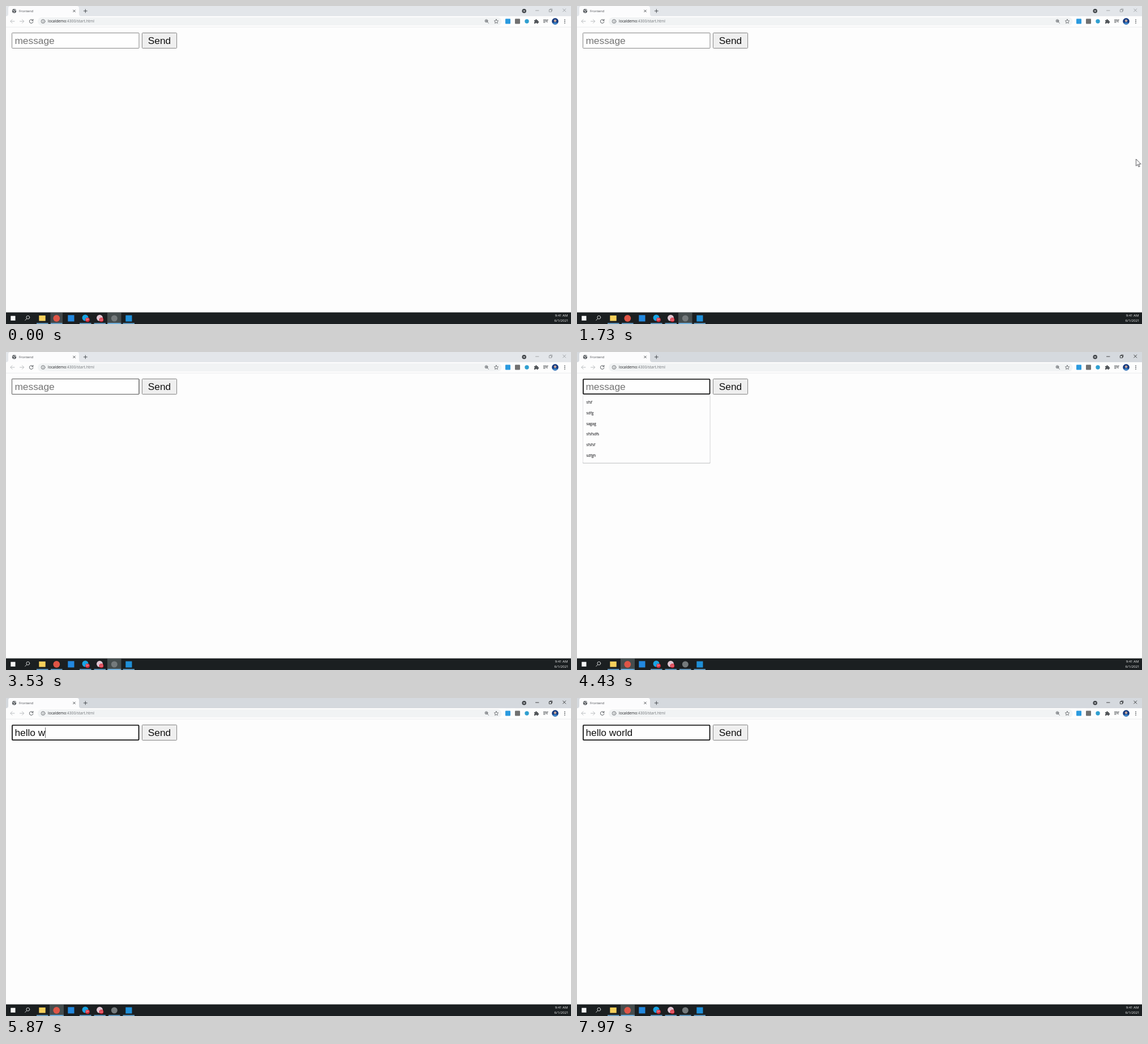
An HTML page for the animation above (8 s loop, 998 by 561 pixels).

```html
<!DOCTYPE html>
<html lang="en">
<head>
<meta charset="utf-8">
<title>Frontend</title>
<style>
  html, body { margin: 0; width: 100%; height: 100%; overflow: hidden; background: #fdfdfd; }
  svg { display: block; width: 100%; height: 100%; }
  text { font-family: "Open Sans", "Noto Sans", sans-serif; }
  .form text { font: 17.33px "Liberation Sans", Arial, sans-serif; white-space: pre; }
  .line { fill: none; stroke-linecap: round; stroke-linejoin: round; }

  /* one 8 s clock for every state */
  .idle, .live, .hover, .menu { animation: 8s step-end infinite; }
  .idle { animation-name: idle; }
  .live { animation-name: live; }
  .hover { animation-name: hover; }
  .menu { animation-name: menu; }
  .glow { animation: glow 8s linear infinite; }
  .pointer { animation: move 8s ease-in-out infinite; }

  @keyframes idle { 0% { opacity: 1 } 46.25%, 100% { opacity: 0 } }
  @keyframes live { 0% { opacity: 0 } 46.25%, 100% { opacity: 1 } }
  @keyframes hover { 0% { opacity: 0 } 38.12% { opacity: 1 } 46.25%, 100% { opacity: 0 } }
  @keyframes menu { 0% { opacity: 0 } 53.75% { opacity: 1 } 60.375%, 100% { opacity: 0 } }
  @keyframes glow { 0%, .4% { opacity: 1 } 3%, 100% { opacity: 0 } }
  @keyframes move {
    0%, 9.6% { transform: translate(1004px, 278px) }
    9.9%, 20.8% { transform: translate(997px, 275px); animation-timing-function: ease-in }
    25.8% { transform: translate(785px, 163px); animation-timing-function: ease-out }
    30.8%, 31.5% { transform: translate(495px, 237px) }
    38.1% { transform: translate(231px, 73px); animation-timing-function: step-start }
    38.2%, 100% { transform: translate(1004px, 278px) }
  }
</style>
</head>
<body>
<svg viewBox="0 0 998 561">
  <defs>
    <g id="controls" class="line">
      <path d="M935.5 8h5.5M983.7 5l5 5m0-5l-5 5"/>
      <path d="M959.7 6.5h3.8v3.8h-3.8zM960.9 6.500v-1.400h3.800v3.800h-1.200"/>
    </g>
    <clipPath id="face"><circle cx="970" cy="27" r="5.8"/></clipPath>
  </defs>

  <rect width="998" height="561" fill="#fdfdfd"/>

  <!-- tab strip -->
  <rect class="idle" width="998" height="18" fill="#e3e6ea"/>
  <rect class="live" width="998" height="18" fill="#d5d9de"/>
  <path d="M0 18q4 0 4-4V4q0-4 4-4h117q4 0 4 4v10q0 4 4 4z" fill="#fcfcfd"/>
  <circle cx="14.500" cy="8.800" r="3.700" fill="#5a5e62"/>
  <path d="M12 7.500l2 .5 1 1.500-1 1.800M15 5.800l1 1.500 1.600.2" class="line" stroke="#fcfcfd" stroke-width=".9"/>
  <text x="23" y="11" font-size="5.900" fill="#4a4d51">Frontend</text>
  <path d="M118.700 7l3.600 3.600m0-3.600l-3.600 3.600M137.300 8.800h6m-3-3v6" class="line" stroke="#3c4043" stroke-width=".9"/>
  <circle cx="915.200" cy="8.800" r="3.800" fill="#45494d"/>
  <path d="M913.300 7.900h3.800l-1.900 2.300z" fill="#e4e6ea"/>
  <use href="#controls" class="idle" stroke="#85888b" stroke-width=".7"/>
  <use href="#controls" class="live" stroke="#1c1d1f" stroke-width=".8"/>

  <!-- toolbar -->
  <path d="M0 37.200h998" stroke="#e4e5e7" stroke-width=".7"/>
  <rect x="56" y="20" width="819.500" height="14.300" rx="7.150" fill="#f1f3f4"/>
  <g class="line" stroke="#b9bcbf" stroke-width="1">
    <path d="M15 27H8m3-3.200L7.800 27l3.200 3.200M24.500 27h7m-3-3.200l3.200 3.200-3.200 3.200"/>
  </g>
  <g class="line" stroke="#505458" stroke-width="1">
    <path d="M47.400 25.200a3.300 3.300 0 1 0 .5 2.700M47.900 23.500v2.300h-2.400"/>
    <circle cx="65.500" cy="27.100" r="3.300" stroke-width=".8"/>
    <path d="M65.500 26.900v1.800m0-3.400v.1" stroke-width=".8"/>
    <circle cx="848.500" cy="26.300" r="2.400" stroke-width=".8"/>
    <path d="M850.300 28.200l2.200 2.200M847.500 26.300h2m-1-1v2" stroke-width=".8"/>
    <path d="M866 23.400l1.100 2.400 2.600.3-1.900 1.800.5 2.600-2.300-1.300-2.300 1.300.5-2.600-1.900-1.800 2.600-.3z" stroke-width=".75"/>
    <path d="M949.400 24.500h5m-5 2.200h5m-5 2.200h3M955.700 28.800v-4.300h1.600"/>
  </g>
  <text x="74" y="29.400" font-size="6.650" fill="#707478"><tspan fill="#202124">localdemo</tspan>:4300/start.html</text>
  <rect x="882" y="22.500" width="9" height="9" rx="1" fill="#2b9adf"/>
  <rect x="899" y="22.500" width="9" height="9" rx="1" fill="#707070"/>
  <circle cx="920" cy="27" r="3.700" fill="#2f9fd0"/>
  <path d="M933 25h2.200a1.300 1.300 0 1 1 2.500 0h2v2.100a1.250 1.250 0 1 1 0 2.400v1.500h-2.100a1.250 1.250 0 0 0-2.500 0H933v-2.200a1.250 1.250 0 0 0 0-2.400z" fill="#505458"/>
  <g clip-path="url(#face)">
    <rect x="964" y="21" width="12" height="12" fill="#153a80"/>
    <circle cx="970" cy="26" r="2.300" fill="#c0a49b"/>
    <ellipse cx="970" cy="32" rx="4.400" ry="3.200" fill="#3c83c7"/>
  </g>
  <g fill="#505458"><circle cx="987" cy="24.300" r=".9"/><circle cx="987" cy="27.200" r=".9"/><circle cx="987" cy="30.100" r=".9"/></g>

  <!-- form -->
  <g class="form">
    <rect x="10.500" y="47.500" width="224.500" height="27" rx=".8" fill="#fefefe" stroke="#858585"/>
    <rect class="hover" x="10.500" y="47.500" width="224.500" height="27" rx=".8" fill="none" stroke="#555"/>
    <rect class="live" x="11" y="48" width="223.500" height="26.200" rx="1.500" fill="#fefefe" stroke="#141414" stroke-width="1.700"/>
    <text id="hint" x="15.400" y="67" fill="#757575">message</text>
    <text id="typed" x="15.400" y="67" fill="#111"></text>
    <rect id="caret" y="52" width=".7" height="18.500" fill="#333"/>
    <rect x="240.400" y="47.500" width="61.200" height="27" rx="1" fill="#efefef" stroke="#828282"/>
    <text x="271" y="67" text-anchor="middle" fill="#111">Send</text>
  </g>

  <!-- suggestions -->
  <g class="menu">
    <rect x="10" y="76" width="225.500" height="120.800" rx="1.500" fill="#c9cacc"/>
    <rect x="10.500" y="75.500" width="224.200" height="120" rx="1.500" fill="#fdfdfd"/>
    <g id="list" font-size="6.400" fill="#202124" stroke="#202124" stroke-width=".1"></g>
  </g>

  <!-- taskbar -->
  <rect y="540.500" width="998" height="20.500" fill="#1b1f21"/>
  <rect class="glow" x="78.500" y="541" width="21.500" height="20" fill="#41474a"/>
  <rect class="idle" x="179" y="541" width="24.500" height="20" fill="#454d4e"/>
  <rect class="live" x="77" y="541" width="25" height="20" fill="#454d4e"/>
  <rect x="8.300" y="546.700" width="8.200" height="8.200" fill="#f4f5f5"/>
  <g class="line" stroke="#e6e8e8" stroke-width=".9"><circle cx="38.800" cy="549.300" r="2.900"/><path d="M36.700 551.500l-2.900 3"/></g>
  <rect x="58.300" y="546" width="11.400" height="9.600" fill="#f6cf5b"/>
  <circle cx="89.300" cy="551" r="5.900" fill="#df5546"/>
  <rect x="109.300" y="545.300" width="11.200" height="11.200" fill="#2388df"/>
  <circle cx="140" cy="550" r="5.500" fill="#18a4e4"/>
  <circle cx="165.500" cy="550.300" r="5.500" fill="#dfc4d0"/>
  <circle cx="191.300" cy="551" r="5.500" fill="#747a7c"/>
  <rect x="211.300" y="545.600" width="11.200" height="11" fill="#1f8fd8"/>
  <g fill="#d92d3d"><circle cx="144" cy="553.500" r="3.800"/><circle cx="168.500" cy="553.500" r="3.800"/></g>
  <g fill="#fff" font-size="4.500" text-anchor="middle"><text x="144" y="555.100">9+</text><text x="168.500" y="555.100">22</text></g>
  <path d="M54 560h20.500M79 560h20.500M130 560h20.500M155.500 560h20.500M181 560h20.500M206.500 560h20.500" stroke="#74b8e8" stroke-width="1.400"/>
  <path class="idle" d="M179 560h24.500" stroke="#74b8e8" stroke-width="1.400"/>
  <path class="live" d="M77 560h25" stroke="#74b8e8" stroke-width="1.400"/>
  <g fill="#f2f3f3" font-size="6" text-anchor="middle"><text x="981" y="548.200">9:41 AM</text><text x="981" y="557.300">6/1/2021</text></g>

  <path class="pointer" d="M0 0V12.200L2.800 9.600 4.700 13.800 6.500 13 4.700 8.900H8.600Z" fill="#fff" stroke="#26262c" stroke-width=".8"/>
</svg>
<script>
  const $ = id => document.getElementById(id);
  const loop = 8000, focusAt = 3700, blink = 500, left = 15.4;
  const message = "hello world";
  const keys = [4830, 5030, 5200, 5400, 5530, 5670, 5800, 5950, 6080, 6250, 6380];

  ["sfsf", "sdfg", "sagag", "sfsfsdfs", "sfsfsf", "sdfgh"].forEach((word, i) => {
    const row = document.createElementNS("http://www.w3.org/2000/svg", "text");
    row.setAttribute("x", 16.5);
    row.setAttribute("y", 91.2 + i * 18.7);
    row.textContent = word;
    $("list").append(row);
  });

  const start = performance.now();
  function draw(now) {
    const t = Math.max(0, now - start) % loop;
    const count = keys.filter(k => k <= t).length;
    const value = message.slice(0, count);
    if ($("typed").textContent !== value) $("typed").textContent = value;
    $("hint").style.opacity = count ? 0 : 1;

    // each key press restarts the caret blink
    const since = t - (count ? keys[count - 1] : focusAt);
    const shown = since >= 0 && Math.floor(since / blink) % 2 === 0;
    $("caret").style.opacity = shown ? 1 : 0;
    $("caret").setAttribute("x", left + (count ? $("typed").getComputedTextLength() : 0));
    requestAnimationFrame(draw);
  }
  draw(start);
</script>
</body>
</html>
```
